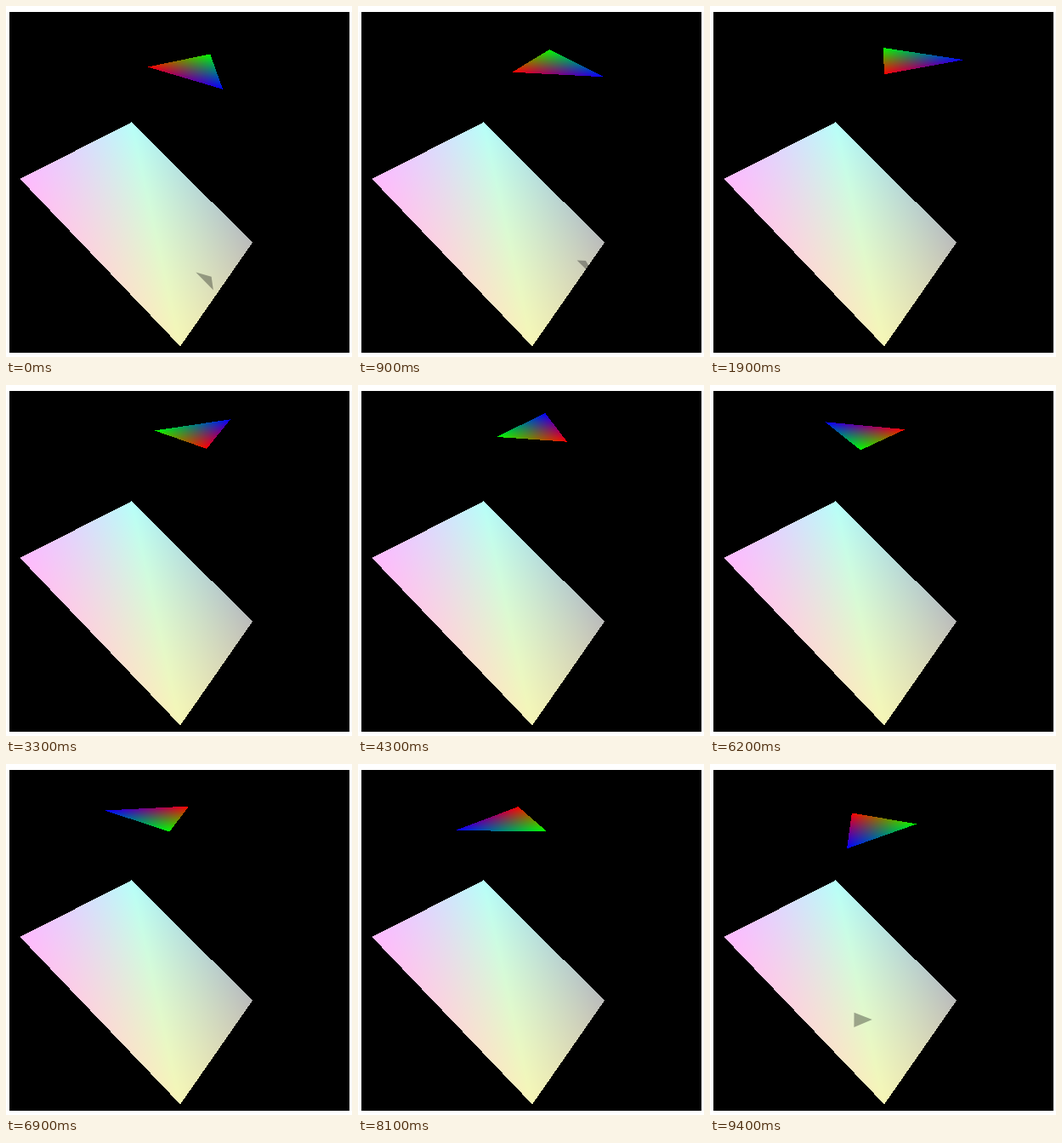
These frames come from a looping animation (407 px wide and 412 px high, 9.5 s). An HTML page with a canvas:

```html
<!DOCTYPE html>
<html lang="en">
<head>
<meta charset="utf-8">
<title>Spinning triangle</title>
<style>
  html, body { margin: 0; width: 100%; height: 100%; overflow: hidden; background: #fff; }
  canvas { display: block; width: 407px; height: 412px; }
</style>
</head>
<body>
<canvas id="stage" width="407" height="412"></canvas>
<script>
const W = 407, H = 412, STEP = 100, STEPS = 95;
const SPEED = 32.63;            // degrees per second
const TURN = 360 / SPEED;       // seconds per full turn
const RAD = Math.PI / 180;
const ctx = document.getElementById('stage').getContext('2d');

// Corners: screen position, depth and colour
const pink   = { x: 16.5, y: 203, h: .4365, c: [255, 184, 255] };
const cyan   = { x: 147.5, y: 136.5, h: .589, c: [182, 255, 250] };
const grey   = { x: 290, y: 277.5, h: .5635, c: [186, 186, 186] };
const yellow = { x: 205, y: 399.5, h: .411, c: [246, 246, 182] };
const floor = [pink, cyan, grey, yellow];

const spokes = [
  { r: 42, a: 90, c: [255, 0, 0] },
  { r: 42, a: -90, c: [0, 255, 0] },
  { r: 94.4, a: 0, c: [0, 0, 255] }
];

const cross = (p, q, x, y) => (q.x - p.x) * (y - p.y) - (q.y - p.y) * (x - p.x);

// Fills a triangle with perspective-correct colour blending
function shade(img, p, q, r) {
  const area = cross(p, q, r.x, r.y);
  if (!area) return;
  const xs = [p.x, q.x, r.x], ys = [p.y, q.y, r.y];
  const x0 = Math.floor(Math.min(...xs)), x1 = Math.ceil(Math.max(...xs));
  const y0 = Math.floor(Math.min(...ys)), y1 = Math.ceil(Math.max(...ys));
  for (let y = y0; y <= y1; y++) {
    for (let x = x0; x <= x1; x++) {
      const px = x + .5, py = y + .5;
      let u = cross(q, r, px, py) / area;
      let v = cross(r, p, px, py) / area;
      let w = 1 - u - v;
      if (u < 0 || v < 0 || w < 0) continue;
      u /= p.h; v /= q.h; w /= r.h;
      const sum = u + v + w, i = (y * W + x) * 4;
      for (let k = 0; k < 3; k++)
        img.data[i + k] = (u * p.c[k] + v * q.c[k] + w * r.c[k]) / sum;
    }
  }
}

function trace(points) {
  ctx.beginPath();
  points.forEach(p => ctx.lineTo(p.x, p.y));
  ctx.closePath();
}

// Vertices on the turning disc
function discPoints(angle) {
  return spokes.map(s => {
    const a = (angle + s.a) * RAD;
    return { x: s.r * Math.cos(a), z: s.r * Math.sin(a), c: s.c };
  });
}

function project(p) {
  const h = 1 - .0012 * p.z;
  return { x: 204.3 + p.x / h, y: 63.8 + .371 * p.z / h, h, c: p.c };
}

function drawShadow(points, t) {
  const s = t > TURN / 2 ? t - TURN : t;
  if (s < -3 || s > 1.6) return;
  const phase = (s + .25) * SPEED * RAD;
  const cx = 226.3 + 70.2 * Math.sin(phase);
  const cy = 248 + 74 * Math.cos(phase);
  const mx = (points[0].x + points[1].x + points[2].x) / 3;
  const mz = (points[0].z + points[1].z + points[2].z) / 3;
  const wide = .25 - .0166 * s, skew = .15 + .073 * s, tall = .14 - .016 * s;
  ctx.save();
  trace(floor);
  ctx.clip();
  ctx.beginPath();
  ctx.rect(0, 270, W, H - 270);
  ctx.clip();
  trace(points.map(p => ({
    x: cx + wide * (p.x - mx),
    y: cy + skew * (p.x - mx) + tall * (p.z - mz)
  })));
  ctx.fillStyle = 'rgba(0, 0, 0, .33)';
  ctx.fill();
  ctx.restore();
}

ctx.fillStyle = '#fff';
ctx.fillRect(0, 0, W, H);
ctx.fillStyle = '#000';
ctx.fillRect(4, 7, 400, 400);
const base = ctx.getImageData(0, 0, W, H);
shade(base, pink, cyan, yellow);
shade(base, cyan, grey, yellow);
const view = ctx.createImageData(W, H);

function draw(ms) {
  const t = (Math.floor(ms / STEP) % STEPS) * STEP / 1000;
  const points = discPoints(61 - SPEED * t);
  view.data.set(base.data);
  shade(view, ...points.map(project));
  ctx.putImageData(view, 0, 0);
  drawShadow(points, t);
}

function tick() {
  draw(performance.now());
  requestAnimationFrame(tick);
}
tick();
</script>
</body>
</html>
```
